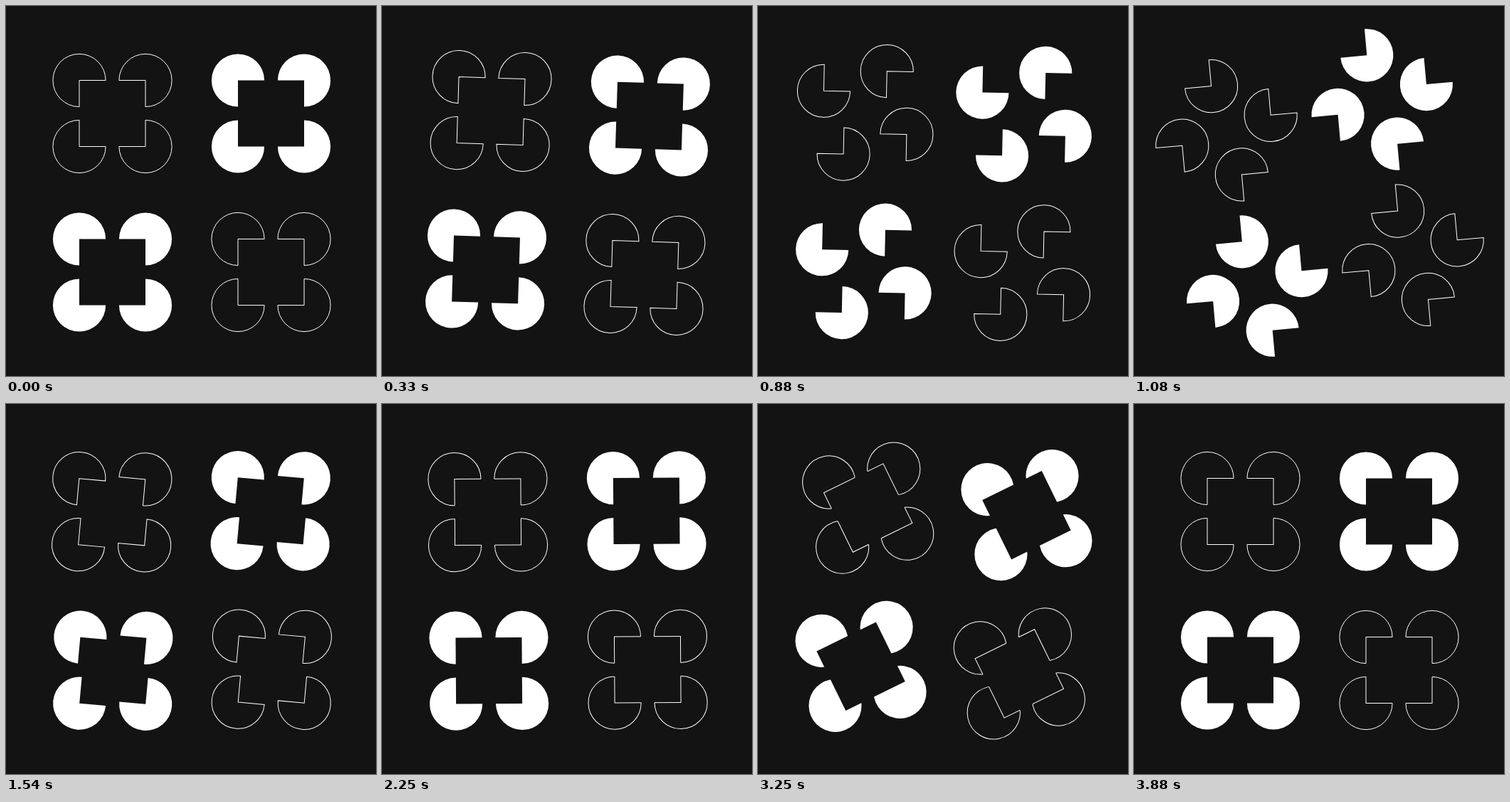
Recreate the animation shown at these times as an HTML page with a canvas. Size 520 px wide and 520 px high, loop 4 s.

```html
<!DOCTYPE html>
<html lang="en">
<head>
<meta charset="utf-8">
<title>Illusory squares</title>
<style>
  html, body { margin: 0; width: 100%; height: 100%; overflow: hidden; background: #131313; }
  canvas { display: block; width: 520px; height: 520px; }
</style>
</head>
<body>
<canvas id="stage" width="520" height="520"></canvas>
<script>
const ctx = document.getElementById('stage').getContext('2d');
const BG = '#131313', INK = '#fff';
const LOOP = 4000, HALF = 2000, STEP = 1000 / 24;
const CENTER = [261, 262.5], GROUP = 111.5, DISC = 46.5, R = 37.1;
const CORNERS = [[-1, -1], [1, -1], [1, 1], [-1, 1]];
const TAU = Math.PI * 2, rad = deg => deg * Math.PI / 180;

// Swing of the whole figure: [step, degrees]
const SWING = [[0, 0], [6, 0.4], [13, 9.1], [15, 11.1], [16.7, 11.75], [18, 10.68],
  [25, -11.7], [26, -11.2], [30, -2.6], [34, -0.8], [39, -0.25], [45, 0], [48, 0]];

const slope = i => (SWING[i + 1][1] - SWING[i][1]) / (SWING[i + 1][0] - SWING[i][0]);

// Tangent that never overshoots its neighbours
function tangent(i) {
  if (i === 0 || i === SWING.length - 1) return 0;
  const a = slope(i - 1), b = slope(i);
  return a * b <= 0 ? 0 : 2 * a * b / (a + b);
}

function swing(ms) {
  const x = ms / STEP;
  let i = 0;
  while (i < SWING.length - 2 && x >= SWING[i + 1][0]) i++;
  const [x0, y0] = SWING[i], [x1, y1] = SWING[i + 1];
  const h = x1 - x0, u = (x - x0) / h, v = 1 - u;
  return y0 * v * v * (1 + 2 * u) + y1 * u * u * (3 - 2 * u)
    + h * u * v * (v * tangent(i) - u * tangent(i + 1));
}

// Quartic ease in and out
function turn(ms) {
  const x = Math.min(1, Math.max(0, (ms - 220) / 1650));
  return x < 0.5 ? 8 * x ** 4 : 1 - 8 * (1 - x) ** 4;
}

function at(x, y, deg, draw) {
  ctx.save();
  ctx.translate(x, y);
  ctx.rotate(rad(deg));
  draw();
  ctx.restore();
}

const paint = solid => solid ? ctx.fill() : ctx.stroke();

// Discs that each carry their own notch
function wedges(solid, spin) {
  CORNERS.forEach(([sx, sy], i) => at(sx * DISC, sy * DISC, i * 90 + spin, () => {
    ctx.beginPath();
    ctx.moveTo(0, 0);
    ctx.arc(0, 0, R, Math.PI / 2, TAU);
    ctx.closePath();
    paint(solid);
  }));
}

function discPath() {
  ctx.beginPath();
  for (const [sx, sy] of CORNERS) {
    ctx.moveTo(sx * DISC + R, sy * DISC);
    ctx.arc(sx * DISC, sy * DISC, R, 0, TAU);
  }
}

// Whole discs covered by one turning square
function covered(solid, spin) {
  discPath();
  paint(solid);
  at(0, 0, spin, () => {
    ctx.fillStyle = BG;
    ctx.fillRect(-DISC, -DISC, 2 * DISC, 2 * DISC);
  });
  if (solid) return;
  discPath();
  ctx.clip();
  at(0, 0, spin, () => ctx.strokeRect(-DISC, -DISC, 2 * DISC, 2 * DISC));
}

function render(time) {
  const now = Math.floor((time % LOOP + 5) / STEP) * STEP % LOOP;
  const second = now >= HALF, ms = now % HALF;
  const dir = second ? -1 : 1, p = turn(ms);

  ctx.fillStyle = BG;
  ctx.fillRect(0, 0, 520, 520);
  ctx.fillStyle = ctx.strokeStyle = INK;
  ctx.lineWidth = 1;

  at(...CENTER, dir * swing(ms), () => {
    CORNERS.forEach(([sx, sy], i) => at(sx * GROUP, sy * GROUP, -dir * 90 * p, () => {
      const solid = i % 2 === 1;
      if (second) covered(solid, 90 * p);
      else wedges(solid, -360 * p);
    }));
  });
}

const start = performance.now();
function tick() {
  render(performance.now() - start);
  requestAnimationFrame(tick);
}
tick();
</script>
</body>
</html>
```
